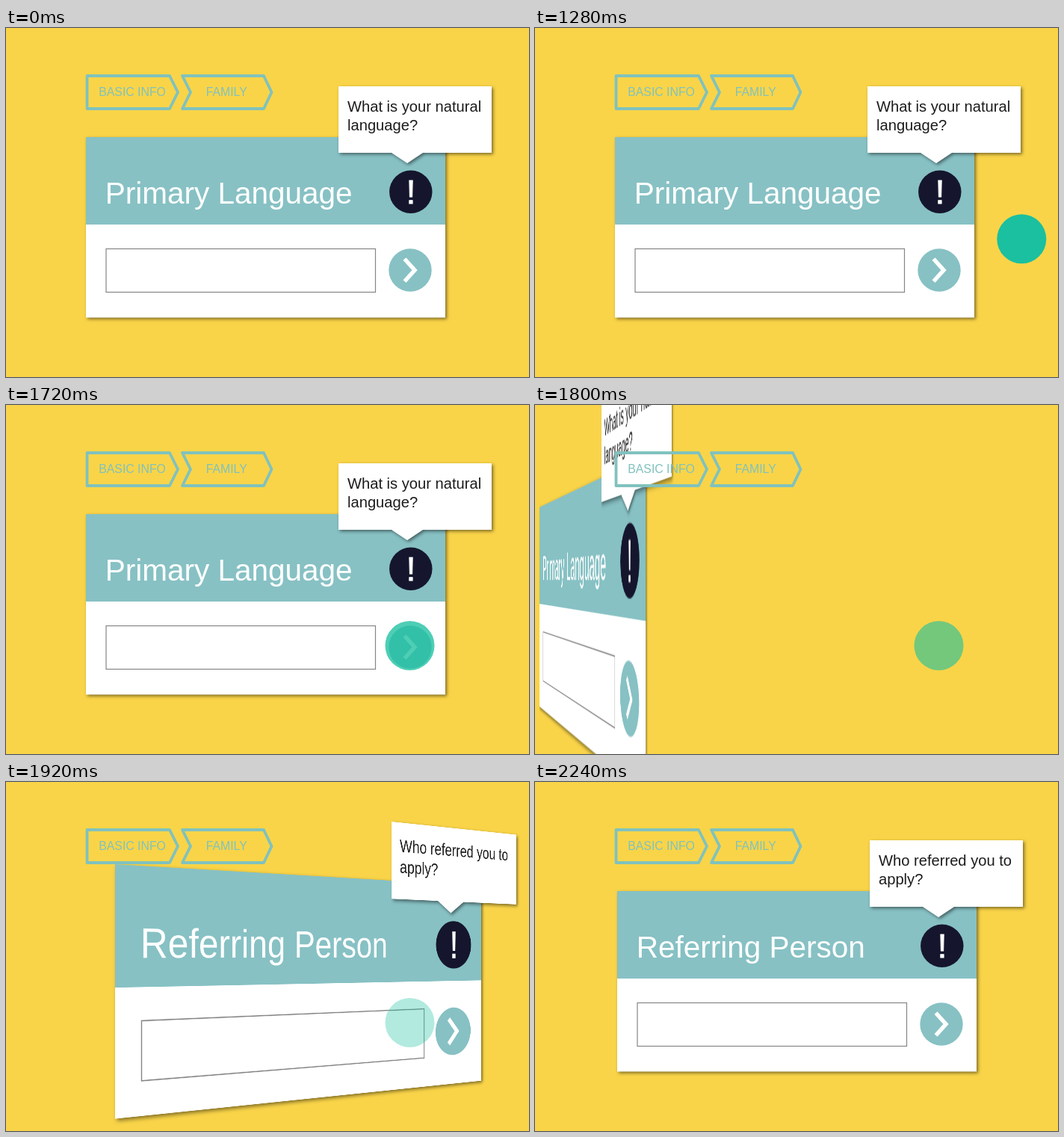
Recreate the animation shown at these times as an HTML page. Size 700 px wide and 467 px high, loop 3.84 s.

```html
<!DOCTYPE html>
<html lang="en">
<head>
<meta charset="utf-8">
<title>Form steps</title>
<style>
  html, body { margin: 0; width: 100%; height: 100%; overflow: hidden; background: #f9d448; }
  #stage {
    position: relative; width: 700px; height: 467px; overflow: hidden;
    perspective: 1160px; perspective-origin: 350px 233.5px;
  }
  svg {
    position: absolute; left: 0; top: 0; width: 700px; height: 467px;
    font-family: "Liberation Sans", Arial, sans-serif;
  }
  #oldCard { transform-origin: -13px 0; }
  #newCard { transform-origin: 754px 0; }
  .shadow { filter: drop-shadow(2px 2.5px 2px rgba(0, 0, 0, .5)); }
  .title { font-size: 40.5px; fill: #fff; }
  .hint { font-size: 20.15px; fill: #1c1c1c; }
  .mark { font-size: 45px; fill: #fff; stroke: #fff; text-anchor: middle; }
  .steps { font-size: 15.8px; fill: #80c2be; }
  .steps path { fill: none; stroke: #80c2be; stroke-width: 3.8; stroke-linejoin: round; }
</style>
</head>
<body>
<div id="stage">
  <svg id="oldCard"></svg>
  <svg id="newCard"></svg>
  <svg class="steps">
    <path d="M108.5 64H219L230 86L219 108H108.5Z"/>
    <path d="M236 64H345L355.5 86L345 108H236L247 86Z"/>
    <text x="124.3" y="90.7">BASIC INFO</text>
    <text x="267.7" y="90.7">FAMILY</text>
  </svg>
  <svg><circle id="pointer" r="33" fill="#1ac0a0"/></svg>
</div>
<script>
const LOOP = 3840, STEP = 40;
const byId = id => document.getElementById(id);
const oldCard = byId('oldCard'), newCard = byId('newCard'), pointer = byId('pointer');
const clamp = x => Math.min(1, Math.max(0, x));

function drawCard(svg, dx, title, hint) {
  svg.innerHTML = `<g transform="translate(${dx} 0)">
    <g class="shadow">
      <rect x="107" y="146" width="481" height="241.5" fill="#fff"/>
      <rect x="107" y="146" width="481" height="117" fill="#87c1c4"/>
    </g>
    <text class="title" x="132.7" y="234.5">${title}</text>
    <rect x="134" y="295.5" width="360.5" height="58" fill="#fff" stroke="#858585" stroke-width="1.2"/>
    <circle cx="541" cy="324" r="28.7" fill="#87c1c4"/>
    <path d="M533.5 309L547 324L533.5 339" fill="none" stroke="#fff" stroke-width="5.5"/>
    <circle cx="541.8" cy="219.3" r="28.7" fill="#15162e"/>
    <text class="mark" x="542" y="235">!</text>
    <path class="shadow" d="M445 78H650V167H558L537 181L516 167H445Z" fill="#fff"/>
    ${hint.map((line, i) => `<text class="hint" x="457" y="${112 + 24.5 * i}">${line}</text>`).join('')}
  </g>`;
}

// Degrees turned since the swap began: 0 to 90 swings the old card out, 90 to 180 brings the new one in.
function swing(dt) {
  if (dt <= 0) return 0;
  if (dt >= 520) return 180;
  if (dt < 80) return 64.8 * (dt / 80) ** 1.6;
  const left = 115.2 * Math.exp(-1.294 * ((dt - 80) / 120) ** 0.96);
  return 180 - left * (1 - (dt / 520) ** 12);
}

function drawPointer(t) {
  const u = clamp((t - 1160) / 448);
  const s = u * u * (3 - 2 * u);
  const curve = (a, b, c) => a * (1 - s) ** 2 + 2 * b * s * (1 - s) + c * s * s;
  pointer.setAttribute('cx', curve(660, 643, 540.5));
  pointer.setAttribute('cy', curve(320.5, 189, 322));
  const fadeIn = t < 960 ? 0 : t < 1000 ? 0.5 : 1;
  pointer.setAttribute('opacity', fadeIn * clamp(1 - (t - 1620) / 450));
}

function draw(time) {
  const t = Math.floor((time % LOOP) / STEP) * STEP;
  const angle = swing(t - 1720);
  oldCard.style.display = angle < 90 ? '' : 'none';
  newCard.style.display = angle < 90 ? 'none' : '';
  oldCard.style.transform = angle ? `rotateY(${-angle}deg)` : 'none';
  newCard.style.transform = angle < 180 ? `rotateY(${180 - angle}deg)` : 'none';
  drawPointer(t);
}

drawCard(oldCard, 0, 'Primary Language', ['What is your natural', 'language?']);
drawCard(newCard, 3, 'Referring Person', ['Who referred you to', 'apply?']);

const start = performance.now();
function tick() {
  draw(performance.now() - start);
  requestAnimationFrame(tick);
}
tick();
</script>
</body>
</html>
```
